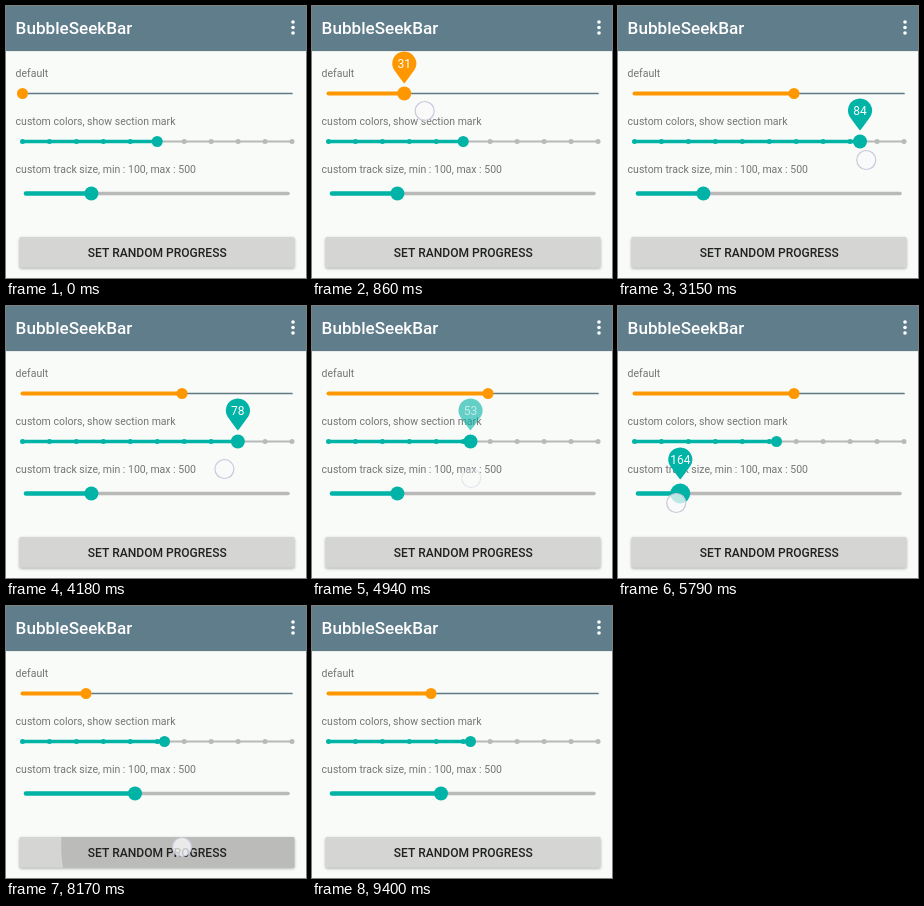
Recreate the animation shown at these times as an HTML page with a canvas. Size 300 by 272 pixels, loop 9890 ms.

```html
<!DOCTYPE html>
<html lang="en">
<head>
<meta charset="utf-8">
<title>BubbleSeekBar</title>
<style>
  html, body { margin: 0; width: 300px; height: 272px; overflow: hidden; background: #f9fbf8; }
  canvas { display: block; }
</style>
</head>
<body>
<canvas id="stage" width="300" height="272"></canvas>
<script>
const ctx = document.getElementById('stage').getContext('2d');
const LOOP = 9890, R = 12;
const PAGE = '#f9fbf8', ORANGE = '#ff9800', TEAL = '#00b3a7', GRAY = '#b8b9b8', SLATE = '#607d8b';

// Each path lists [time, thumb x]; down/up bound the bubble's life.
const bars = [
  { y: 87.5, from: 16.5, to: 286, min: 0, max: 100, color: ORANGE, rest: '#607a85', thick: 4, thin: 1.7, inset: 0,
    r: 5.5, big: 7, lift: 30, down: 210, hide: 1500, up: 1690,
    path: [[480, 16.5], [900, 100], [1180, 155], [1290, 164], [1400, 176]] },
  { y: 135.5, from: 16.5, to: 286, min: 0, max: 100, color: TEAL, rest: GRAY, thick: 3.6, thin: 2, inset: 0, marks: 10,
    r: 5.5, big: 7, lift: 31, down: 2110, hide: 4860, up: 5060,
    path: [[2500, 151.2], [3070, 228], [3150, 242], [3215, 242], [3500, 286], [3920, 286], [4180, 232], [4700, 158.5]] },
  { y: 187.5, from: 18, to: 284, min: 100, max: 500, color: TEAL, rest: GRAY, thick: 4.6, thin: 3.5, inset: 2,
    r: 7, big: 10, lift: 34, down: 5290, hide: 6640, up: 6840,
    path: [[5520, 85.4], [5790, 62.3], [6020, 51.5], [6060, 51.5], [6250, 108], [6350, 118], [6470, 129]] }
];
const fingerY = [[0, 105], [1900, 105], [1901, 154], [3900, 154], [4180, 163], [4700, 172], [5100, 172], [5101, 197]];
const clicks = [
  { down: 7230, set: 7390, fade: 7470, end: 7530, x: 80 },
  { down: 8050, set: 8230, fade: 8470, end: 8560, x: 211 },
  { down: 8820, set: 8980, fade: 9320, end: 9400, x: 119 }
];

const clamp = v => Math.max(0, Math.min(1, v));
const ramp = (t, a, b) => clamp((t - a) / (b - a));

function along(keys, t) {
  if (t <= keys[0][0]) return keys[0][1];
  for (let i = 1; i < keys.length; i++) {
    const [a, va] = keys[i - 1], [b, vb] = keys[i];
    if (t < b) return va + (vb - va) * (t - a) / (b - a);
  }
  return keys[keys.length - 1][1];
}

function disc(x, y, r, color) {
  ctx.fillStyle = color;
  ctx.beginPath();
  ctx.arc(x, y, r, 0, 2 * Math.PI);
  ctx.fill();
}

function line(x1, x2, y, width, color) {
  ctx.strokeStyle = color;
  ctx.lineWidth = width;
  ctx.lineCap = 'round';
  ctx.beginPath();
  ctx.moveTo(x1, y);
  ctx.lineTo(x2, y);
  ctx.stroke();
}

function text(str, x, y, size, color, weight = 400, align = 'left') {
  ctx.font = `${weight} ${size}px Roboto, sans-serif`;
  ctx.textAlign = align;
  ctx.fillStyle = color;
  ctx.fillText(str, x, y);
}

function box(x, y, w, h, r, color) {
  ctx.fillStyle = color;
  ctx.beginPath();
  ctx.roundRect(x, y, w, h, r);
  ctx.fill();
}

function thumbX(bar, t) {
  const click = bar === bars[0] && clicks.filter(c => t >= c.set).pop();
  return click ? click.x : along(bar.path, t);
}

function drawBar(bar, t) {
  const { y, from, to, color, rest, marks, inset } = bar;
  const x = thumbX(bar, t);
  line(x, to - inset, y, bar.thin, rest);
  if (x > from) line(from + inset, x, y, bar.thick, color);
  for (let i = 0; marks && i <= marks; i++) {
    const mx = from + (to - from) * i / marks;
    disc(mx, y, 2.5, mx <= x ? color : rest);
  }
  disc(x, y, t >= bar.down && t < bar.up ? bar.big : bar.r, color);
}

function drawBubble(bar, t) {
  const alpha = Math.min(ramp(t, bar.down, bar.down + 200), 1 - ramp(t, bar.hide, bar.up));
  if (!alpha) return;
  const side = R * Math.sqrt(3) / 2, tip = R * 5 / 3;
  // The number runs slightly ahead of the thumb.
  const part = (thumbX(bar, t + 40) - bar.from) / (bar.to - bar.from);
  ctx.save();
  ctx.globalAlpha = alpha;
  ctx.translate(thumbX(bar, t), bar.y - bar.lift);
  ctx.fillStyle = bar.color;
  ctx.beginPath();
  ctx.moveTo(0, tip);
  ctx.quadraticCurveTo(-1.7, tip - 1.7, -side, R / 2);
  ctx.arc(0, 0, R, Math.PI * 5 / 6, Math.PI / 6);
  ctx.quadraticCurveTo(1.7, tip - 1.7, 0, tip);
  ctx.fill();
  text(Math.round(bar.min + part * (bar.max - bar.min)), 0, 4.5, 12, '#fff', 400, 'center');
  ctx.restore();
}

function drawFinger(x, y, alpha) {
  if (alpha <= 0) return;
  ctx.globalAlpha = alpha;
  disc(x, y, 9.5, 'rgba(248,250,250,.75)');
  ctx.strokeStyle = '#c8c9dc';
  ctx.lineWidth = 1.2;
  ctx.stroke();
  ctx.globalAlpha = 1;
}

function drawButton(t) {
  ctx.save();
  ctx.shadowColor = 'rgba(0,0,0,.3)';
  ctx.shadowBlur = 3;
  ctx.shadowOffsetY = 1;
  box(13.5, 231, 275, 30.8, 1.5, '#d5d6d3');
  ctx.restore();
  for (const c of clicks) {
    if (t < c.down || t >= c.down + 300) continue;
    ctx.save();
    ctx.beginPath();
    ctx.rect(13.5, 231, 275, 30.8);
    ctx.clip();
    ctx.globalAlpha = 1 - ramp(t, c.set, c.down + 300);
    disc(176, 241, 20 + 150 * ramp(t, c.down, c.set), 'rgba(0,0,0,.12)');
    ctx.restore();
  }
  text('SET RANDOM PROGRESS', 151.2, 251, 12.05, '#202121', 500, 'center');
}

function draw(t) {
  ctx.fillStyle = PAGE;
  ctx.fillRect(0, 0, 300, 272);
  ctx.fillStyle = SLATE;
  ctx.fillRect(0, 0, 300, 45);
  ctx.fillStyle = 'rgba(0,0,0,.06)';
  ctx.fillRect(0, 45, 300, 1);
  text('BubbleSeekBar', 9.6, 28, 17.1, '#fff', 500);
  for (const y of [16, 21.5, 27]) disc(287, y, 1.8, '#fff');

  const label = '#747574';
  text('default', 9.6, 70.7, 10.5, label);
  text('custom colors, show section mark', 9.6, 119.2, 10.5, label);
  text('custom track size, min : 100, max : 500', 9.6, 167.4, 10.5, label);

  drawButton(t);
  for (const bar of bars) drawBar(bar, t);
  for (const bar of bars) {
    drawBubble(bar, t);
    if (t >= bar.down && t < bar.up) {
      const x = along(bar.path, t + 100) + 0.7;
      drawFinger(x, along(fingerY, t), 1 - ramp(t, bar.hide - 100, bar.up));
    }
  }
  for (const c of clicks) {
    if (t >= c.down) drawFinger(176, 241, 1 - ramp(t, c.fade, c.end));
  }
}

const start = performance.now();
function tick() {
  draw((performance.now() - start) % LOOP);
  requestAnimationFrame(tick);
}
tick();
</script>
</body>
</html>
```
